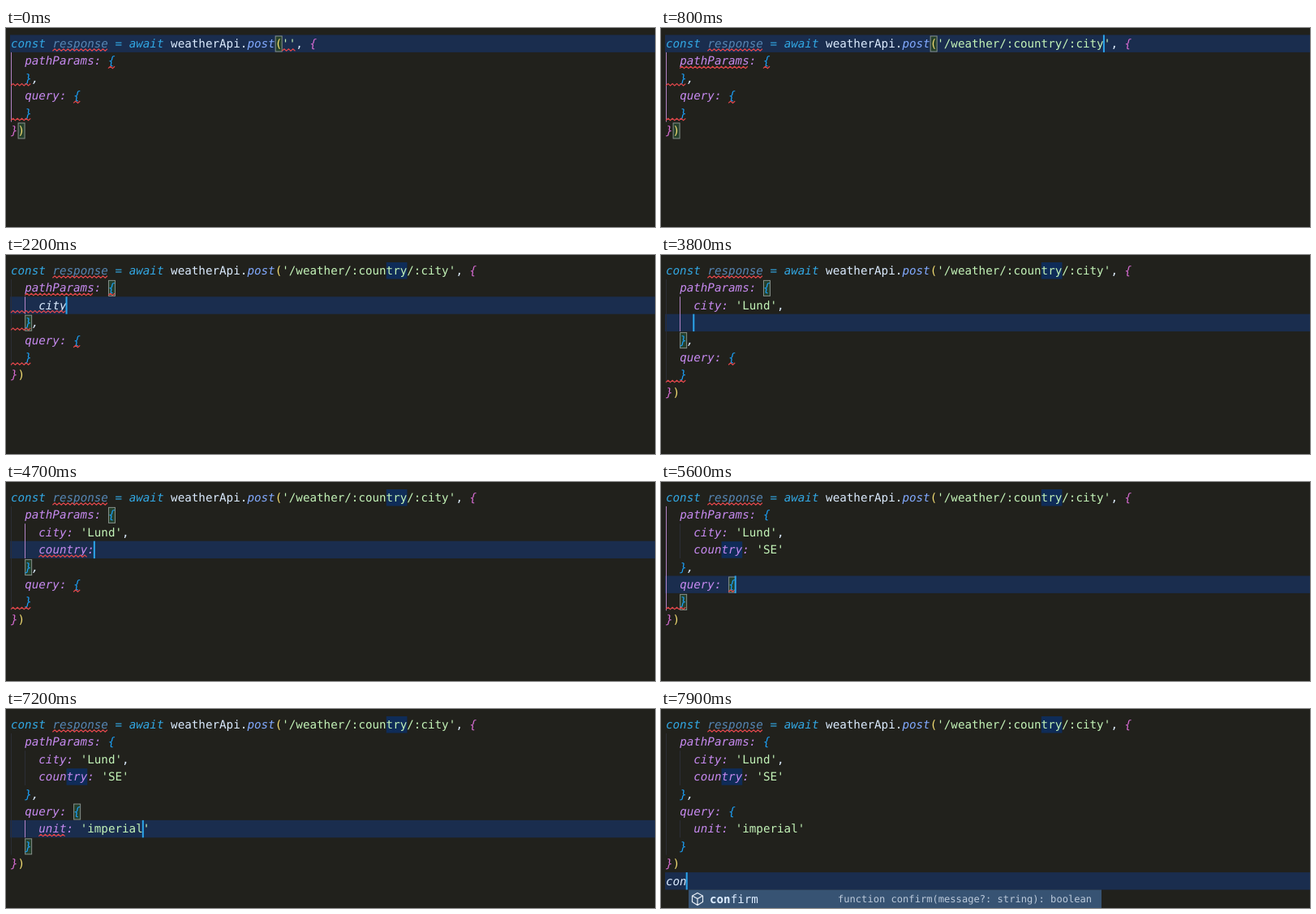
An HTML page that plays this animation: 800 px wide and 245 px high, repeating every 8000 ms.

```html
<!DOCTYPE html>
<html lang="en">
<head>
<meta charset="utf-8">
<title>Typed request</title>
<style>
  html, body { margin: 0; width: 100%; height: 100%; overflow: hidden; background: #21211c; }
  svg { display: block; width: 800px; height: 245px; }
  text { font: 14.235px "DejaVu Sans Mono", monospace; white-space: pre; text-rendering: geometricPrecision; }
  .i { font-style: italic; }
  .key { fill: #32a8e4; }
  .dim { fill: #5686b4; }
  .var { fill: #dcecff; }
  .fn { fill: #82aaff; }
  .str { fill: #c4f4b8; }
  .prop { fill: #c78af0; }
  .b1 { fill: #f2dc72; }
  .b2 { fill: #d76bd2; }
  .b3 { fill: #1c9ff5; }
  .wave { fill: none; stroke: #e2474b; stroke-width: 1.2; }
  .pair { fill: #25402c; stroke: #87908a; }
  .hint { font-size: 12.1px; fill: #bccadb; }
</style>
</head>
<body>
<svg id="stage" viewBox="0 0 800 245"></svg>
<script>
const LEFT = 6, TOP = 8.5, CHAR = 8.57, ROW = 21.4, TICK = 100, TICKS = 80;
const PATH = '/weather/:country/:city';
const stage = document.getElementById('stage');
const colX = c => LEFT + c * CHAR;
const rowY = r => TOP + r * ROW;

// Characters typed by a tick, from [tick, count] points.
function count(k, points) {
  let [k0, n0] = points[0];
  if (k <= k0) return n0;
  for (const [k1, n1] of points) {
    if (k <= k1) return Math.floor(n0 + (n1 - n0) * (k - k0) / (k1 - k0) + 1e-6);
    [k0, n0] = [k1, n1];
  }
  return n0;
}

const typing = {
  path: [[0, 0], [8, 23]],
  city: [[18, 0], [22, 4], [27, 4], [36, 13]],
  country: [[38, 0], [45, 7], [46, 8], [47, 8], [49, 10], [50, 10], [53, 13]],
  unit: [[62, 0], [66, 4], [70, 7], [72, 15], [73, 16]],
  con: [[77, 0], [79, 3]]
};

const rect = (x, y, w, h, attrs) => `<rect x="${x}" y="${y}" width="${w}" height="${h}" ${attrs}/>`;
const label = (x, y, cls, s) => `<text x="${x}" y="${y}" class="${cls}">${s}</text>`;
const pair = (r, c) => rect(colX(c) + .5, rowY(r) + 1.5, 8, 19, 'class="pair"');
const mark = (r, c) => rect(colX(c), rowY(r) + .5, 3 * CHAR, 20.5, 'fill="#0f2c58"');
const guide = (c, from, to, color) =>
  rect(Math.round(colX(c)), rowY(from), 1, (to - from) * ROW, `fill="${color}"`);

function wave(r, from, to) {
  const y = rowY(r) + 18.5, end = colX(to);
  let x = colX(from), up = false, d = `M${x} ${y + 1.2}`;
  while ((x += 2.7) < end) {
    d += `L${x} ${y + (up ? 1.2 : -1.2)}`;
    up = !up;
  }
  return `<path class="wave" d="${d}"/>`;
}

// A row is a list of [class, text] tokens.
function drawRow(tokens, r) {
  let c = 0, out = '';
  for (const [cls, s] of tokens) {
    if (s.trim()) out += label(colX(c), rowY(r) + 15.5, cls, s);
    c += s.length;
  }
  return out;
}

// An object entry as typed so far, with the closing quote added by the editor.
function entry(full, n) {
  const s = full.slice(0, n), colon = full.indexOf(':'), open = full.indexOf("'");
  const close = full.lastIndexOf("'");
  const named = n > colon;
  const value = n > open ? s.slice(open, close + 1) + (n <= close ? "'" : '') : '';
  return [['', '    '], [named ? 'i prop' : 'i var', s.slice(0, colon)],
    ['i prop', s.slice(colon, open)], ['str', value], ['var', s.slice(close + 1)]];
}

function suggestion(r) {
  const y = rowY(r);
  return rect(34, y, 509, 24, 'fill="#375373"') +
    `<path d="M45 ${y + 4}l6.5 3.5v7.5l-6.5 4-6.5-4v-7.5zm-6.5 3.5l6.5 3.5 6.5-3.5M45 ${y + 11}v8"
      fill="none" stroke="#e8eef5" stroke-width="1.2"/>` +
    label(60, y + 16, 'var', '<tspan font-weight="bold">con</tspan>firm') +
    label(218, y + 15.5, 'hint', 'function confirm(message?: string): boolean');
}

function render(k) {
  const n = {};
  for (const id in typing) n[id] = count(k, typing[id]);

  const rows = [
    [['i key', 'const '], ['i dim', 'response'], ['key', ' = '], ['i key', 'await '], ['var', 'weatherApi.'],
      ['i fn', 'post'], ['b1', '('], ['str', `'${PATH.slice(0, n.path)}'`], ['var', ', '], ['i b2', '{']],
    [['', '  '], ['i prop', 'pathParams: '], ['i b3', '{']]
  ];
  if (k >= 14) rows.push(entry("city: 'Lund',", n.city));
  if (k >= 37) rows.push(entry("country: 'SE'", n.country));
  const close = rows.length, query = close + 1;
  rows.push([['', '  '], ['i b3', '}'], ['i var', ',']]);
  rows.push([['', '  '], ['i prop', 'query: '], ['i b3', '{']]);
  if (k >= 58) rows.push(entry("unit: 'imperial'", n.unit));
  const end = rows.length;
  rows.push([['', '  '], ['i b3', '}']]);
  rows.push([['i b2', '}'], ['b1', ')']]);
  if (k >= 77) rows.push([['i var', 'con'.slice(0, n.con)]]);

  const [row, col] =
    k < 10 ? [0, 40 + n.path] :
    k < 14 ? [1, 15] :
    k < 37 ? [2, 4 + n.city] :
    k < 55 ? [3, 4 + n.country] :
    k < 58 ? [query, 10] :
    k < 75 ? [query + 1, 4 + n.unit] :
    k < 77 ? [end + 1, 2] : [end + 2, n.con];

  let out = rect(5, rowY(row), 795, ROW, 'fill="#1a2d4e"');

  // Indent guides
  const faint = '#2b2d35', bright = '#b283c4';
  out += guide(0, 1, end + 1, faint) + guide(2, 2, close, faint) + guide(2, query + 1, end, faint);
  const inCity = k >= 19 && k < 55, inUnit = k >= 63 && k < 75;
  if (inCity) out += guide(2, 2, close, bright);
  else if (inUnit) out += guide(2, query + 1, end, bright);
  else if (k < 75) out += guide(0, 1, end + 1, bright);

  if (k >= 21) out += mark(0, 54);
  if (k >= 55) out += mark(3, 8);

  // Matching brackets
  if (k < 10 || k === 75 || k === 76) out += pair(0, 38) + pair(end + 1, 1);
  else if (k < 55) out += pair(1, 14) + pair(close, 2);
  else if (k < 75) out += pair(query, 9) + pair(end, 2);

  out += rows.map(drawRow).join('');

  // Error underlines: row, first column, last column, shown
  const errors = [
    [0, 6, 14, true],
    [0, 39, 41 + n.path, k < 8],
    [1, 2, 12, k >= 8 && k < 37],
    [1, 14, 15, k < 30],
    [close, 0, 3, k < 25],
    [2, 0, 4 + n.city, k >= 14 && k < 25],
    [2, 4, 8, k >= 25 && k < 28],
    [3, 4, 4 + Math.min(7, n.country), k >= 39 && k < 53],
    [query, 9, 10, k < 63],
    [end, 0, 3, k < 63],
    [query + 1, 0, 4, k >= 58 && k < 63],
    [query + 1, 4, 4 + Math.min(4, n.unit), inUnit && k < 74]
  ];
  for (const [r, from, to, shown] of errors) if (shown) out += wave(r, from, to);

  if (k !== 0 && k !== 62) out += rect(colX(col) - 1, rowY(row), 2, ROW, 'fill="#2ba4ea"');
  if (k >= 79) out += suggestion(10);
  stage.innerHTML = out;
}

let last = -1;
function frame() {
  const k = Math.floor(performance.now() / TICK) % TICKS;
  if (k !== last) render(last = k);
  requestAnimationFrame(frame);
}
frame();
</script>
</body>
</html>
```
